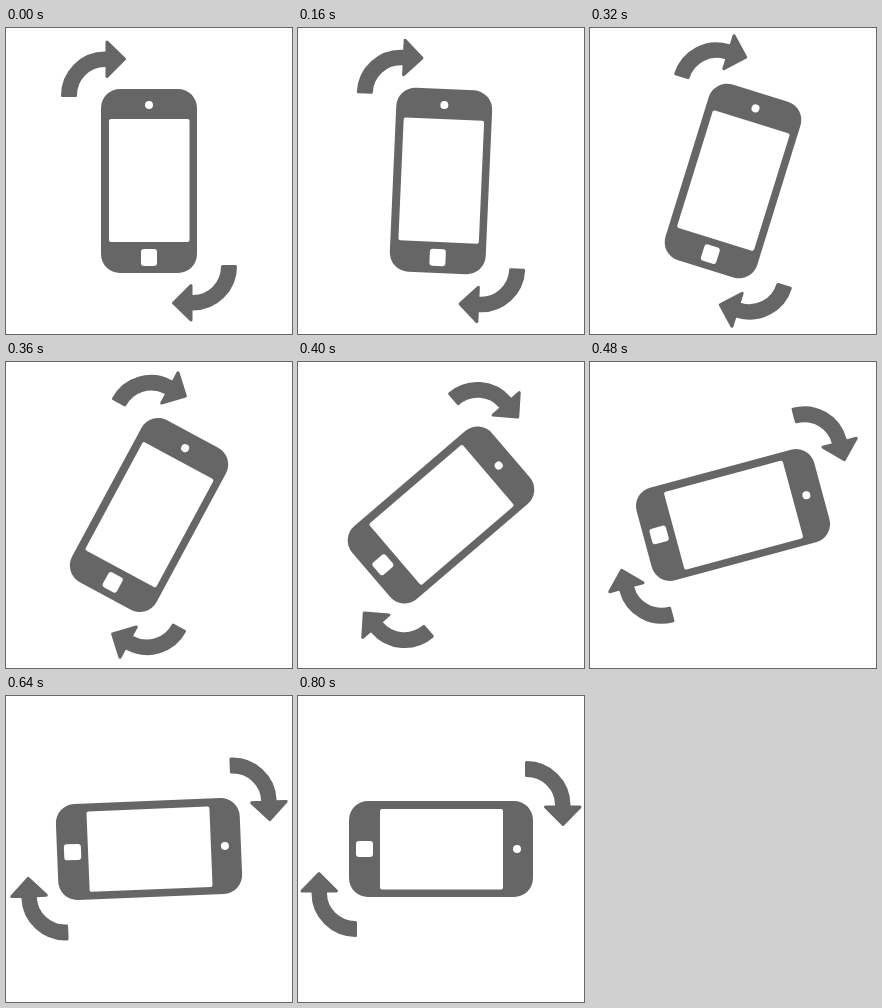
Write an HTML page that moves like this. It is 286x306 px and loops after 4 s.

```html
<!DOCTYPE html>
<html lang="en">
<head>
<meta charset="utf-8">
<title>Rotate your phone</title>
<style>
html, body { margin: 0; width: 100%; height: 100%; overflow: hidden; background: #fff; }
svg { display: block; }
</style>
</head>
<body>
<svg width="286" height="306" viewBox="0 0 286 306">
  <g id="scene" fill="#666">
    <rect x="95" y="61" width="96" height="184" rx="19"/>
    <g fill="#fff">
      <rect x="103" y="91" width="80.5" height="123" rx="2"/>
      <circle cx="143" cy="77" r="4"/>
      <rect x="135" y="221" width="16" height="17" rx="3"/>
    </g>
    <path id="arrow" stroke="#666" stroke-width="3" stroke-linejoin="round"
      d="M56.5 67.5A42.5 42.5 0 0 1 99 25H101V14L118.5 31 101 48.5V37.5H99A29.5 30 0 0 0 69.5 67.5Z"/>
    <use href="#arrow" transform="rotate(180 143 153)"/>
  </g>
</svg>
<script>
const LOOP = 4000, TURN = 800, STEP = 40;
const scene = document.getElementById('scene');

// Cubic Bézier easing (.8, 0, .175, 1), solved for x by bisection
function ease(x) {
  if (x >= 1) return 1;
  let lo = 0, hi = 1, s;
  for (let i = 0; i < 30; i++) {
    s = (lo + hi) / 2;
    const r = 1 - s;
    if (3 * r * r * s * 0.8 + 3 * r * s * s * 0.175 + s ** 3 < x) lo = s;
    else hi = s;
  }
  return s * s * (3 - 2 * s);
}

const start = performance.now();

function draw() {
  const t = (performance.now() - start) % LOOP;
  const stepped = Math.floor(t / STEP) * STEP;
  scene.setAttribute('transform', `rotate(${90 * ease(stepped / TURN)} 143 153)`);
  requestAnimationFrame(draw);
}
draw();
</script>
</body>
</html>
```
